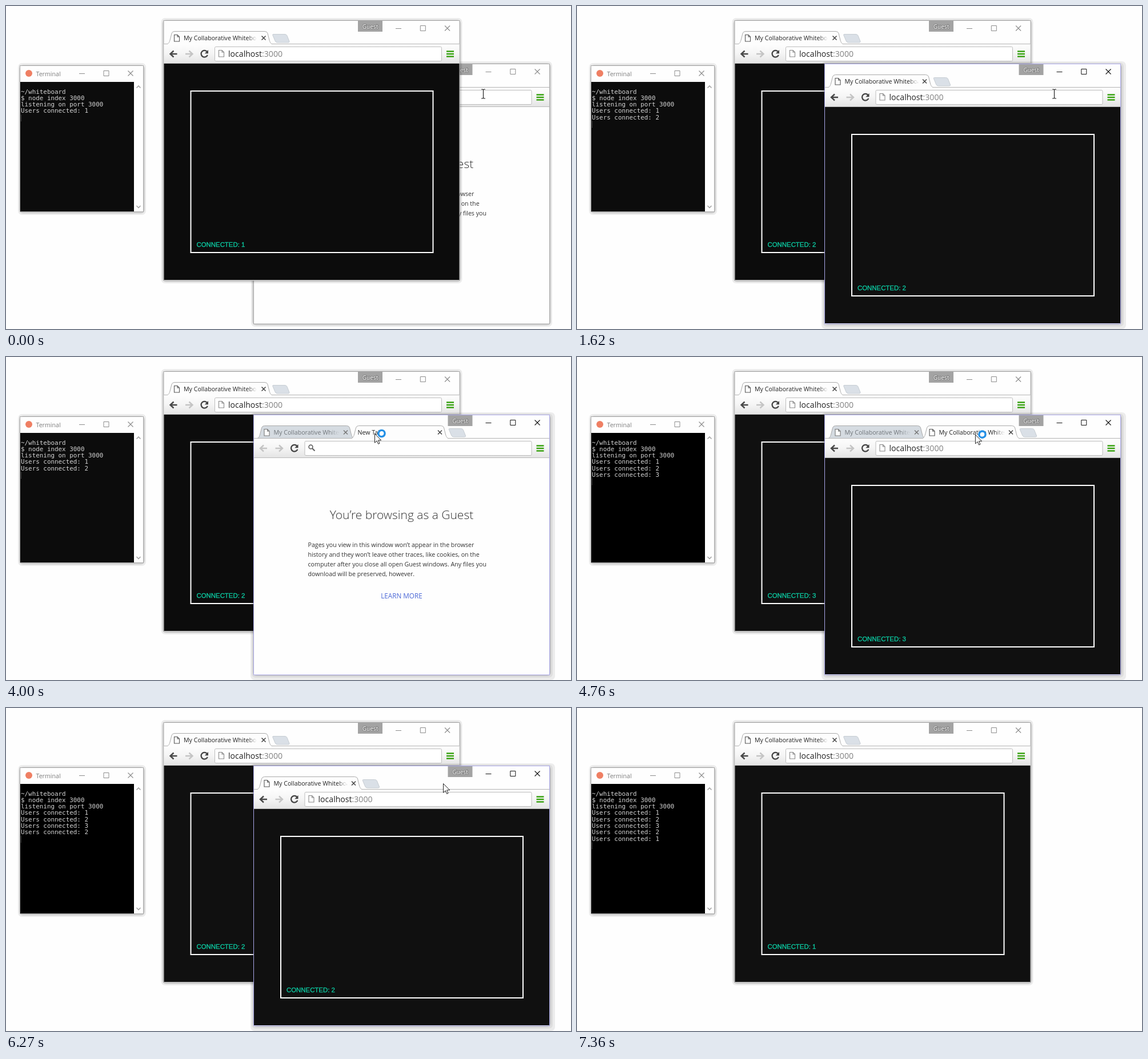
Recreate the animation shown at these times as an HTML page. Size 989 by 566 pixels, loop 7810 ms.

```html
<!DOCTYPE html>
<html lang="en">
<head>
<meta charset="utf-8">
<title>Collaborative whiteboard</title>
<style>
html, body { margin: 0; width: 100%; height: 100%; overflow: hidden; background: #fefefe; }
svg { display: block; }
text { white-space: pre; }
.ui { font-family: "Open Sans", "Noto Sans", sans-serif; font-size: 10.65px; }
.url { font-size: 14.1px; }
.head { font-size: 21px; font-weight: 300; }
.mono { font-family: "DejaVu Sans Mono", monospace; font-size: 10.9px; }
.count { font-family: "Liberation Sans", Arial, sans-serif; font-size: 11.4px; fill: #0cc8a0; stroke: #0cc8a0; stroke-width: .35px; }
</style>
</head>
<body>
<svg id="stage" width="989" height="566" viewBox="0 0 989 566">
  <defs>
    <linearGradient id="bar" x2="0" y2="1">
      <stop offset="0" stop-color="#fdfdfd"/><stop offset=".45" stop-color="#f6f6f6"/><stop offset="1" stop-color="#e3e3e3"/>
    </linearGradient>
    <linearGradient id="fadeOn">
      <stop offset="0" stop-color="#fdfdfd" stop-opacity="0"/><stop offset="1" stop-color="#fdfdfd"/>
    </linearGradient>
    <linearGradient id="fadeOff">
      <stop offset="0" stop-color="#d5dbe1" stop-opacity="0"/><stop offset="1" stop-color="#d5dbe1"/>
    </linearGradient>
  </defs>
  <g id="view"></g>
</svg>
<script>
const LOOP = 7810;
const TITLE = 'My Collaborative Whiteboard';
const URL_TEXT = 'localhost:3000';
const view = document.getElementById('view');
const pen = document.createElement('canvas').getContext('2d');

const clamp = v => Math.max(0, Math.min(1, v));
const span = (t, a, b) => clamp((t - a) / (b - a));
const smooth = k => k * k * (3 - 2 * k);
const within = (t, a, b) => t >= a && t < b;

const rect = (x, y, w, h, fill, more = '') =>
  `<rect x="${x}" y="${y}" width="${w}" height="${h}" fill="${fill}" ${more}/>`;
const path = (d, stroke, width = 1, fill = 'none', more = '') =>
  `<path d="${d}" stroke="${stroke}" stroke-width="${width}" fill="${fill}" ${more}/>`;
const text = (x, y, str, cls, fill, more = '') =>
  `<text x="${x}" y="${y}" class="${cls}" fill="${fill}" ${more}>${str}</text>`;
const move = (x, y, body) => `<g transform="translate(${x} ${y})">${body}</g>`;

function textWidth(str) {
  pen.font = '14.1px "Open Sans", "Noto Sans", sans-serif';
  return pen.measureText(str).width;
}

// Connected users over time: [ms, count]
const USERS = [[0, 1], [1300, 2], [4420, 3], [5940, 2], [6980, 1]];
const usersAt = t => USERS.filter(u => t >= u[0]).map(u => u[1]);

// Pointer strokes: start ms, end ms, then the points of a quadratic curve
const STROKES = [
  [2870, 3120, [835, 154], [780, 82], [645, 134]],
  [4570, 4910, [645, 134], [690, 136], [731, 136]],
  [5050, 5570, [731, 136], [782, 146], [765, 132]],
  [6270, 6850, [765, 132], [860, 114], [940, 112]],
  [7100, 7350, [940, 112], [942, 330], [942, 570]]
];

function pointerAt(t) {
  const [from, to, a, c, b] = STROKES.filter(s => t >= s[0]).pop() || STROKES[0];
  const k = smooth(span(t, from, to)), j = 1 - k;
  return a.map((v, i) => j * j * v + 2 * j * k * c[i] + k * k * b[i]);
}

// One typed letter, then the suggestion list, then the completed address
function typingAt(t) {
  const start = t < 4170 ? 1050 : 4170, age = t - start;
  return within(age, 0, 530) ? { list: age >= 30, tail: age >= 210 } : null;
}

function shadow(x, y, w, h, active) {
  const layer = (l, t, r, b, o) =>
    rect(x - l, y - t, w + l + r, h + t + b, '#000', `rx="7" opacity="${o}"`);
  return active
    ? layer(5, 4, 9, 9, .07) + layer(3, 2, 5, 5, .06) + layer(1, 0, 2, 2, .12)
    : layer(4, 4, 4, 5, .07) + layer(2, 1, 2, 2.5, .12);
}

function captionButtons(x, y, gap, color, hot) {
  const c = x + gap * 2;
  return (hot ? rect(c - 21, y - 13, 43, 27, '#e81123') : '') +
    path(`M${x - 5} ${y + .5}h10`, color) +
    path(`M${x + gap - 4.5} ${y - 4.5}h9v9h-9z`, color) +
    path(`M${c - 4.5} ${y - 4.5}l9 9m0 -9l-9 9`, hot ? '#fff' : color, 1.1);
}

const pageIcon = (x, y, color) =>
  path(`M${x + .5} ${y + .5}h5.5l3.5 3.5v8h-9zM${x + 6} ${y + .5}v3.5h3.5`, color, 1.1, '#fff');
const searchIcon = (x, y) =>
  `<circle cx="${x}" cy="${y}" r="3.4" fill="none" stroke="#666" stroke-width="1.7"/>` +
  path(`M${x + 2.5} ${y + 2.5}l4.5 4.5`, '#666', 2.2);

function tab(left, w, { active, title, hot }) {
  const r = left + w, close = r - 16, blank = title === 'New Tab';
  const tx = left + (blank ? 12 : 30), room = Math.max(0, close - 12 - tx);
  const shape = `M${left} 67C${left + 4} 66 ${left + 4.5} 64 ${left + 6} 60L${left + 9} 48Q${left + 10} 44.5 ${left + 14} 44.5` +
    `H${r - 14}Q${r - 10} 44.5 ${r - 9} 48L${r - 6} 60C${r - 4.5} 64 ${r - 4} 66 ${r} 67`;
  const fade = rect(Math.max(0, room - 16), 0, 16, 20, `url(#${active ? 'fadeOn' : 'fadeOff'})`);
  return path(shape, '#aaa', 1, active ? '#fdfdfd' : '#d5dbe1') +
    (blank ? '' : pageIcon(left + 13, 50, active ? '#555' : '#777')) +
    `<svg x="${tx}" y="45" width="${room}" height="20">${text(0, 15, title, 'ui', active ? '#222' : '#70757a')}${fade}</svg>` +
    (hot ? `<circle cx="${close}" cy="56" r="7" fill="#b5443a"/>` : '') +
    path(`M${close - 3.5} 52.5l7 7m0 -7l-7 7`, hot ? '#fff' : active ? '#444' : '#777', 1.5);
}

const newTabButton = (x, hot) =>
  path(`M${x + 2} 49.5H${x + 22}Q${x + 25} 49.5 ${x + 26} 52L${x + 30} 62Q${x + 30.5} 64 ${x + 28} 64H${x + 9}` +
    `Q${x + 6} 64 ${x + 5} 61L${x + 1} 51.5Q${x} 49.5 ${x + 2} 49.5z`, '#c6ccd2', 1, hot ? '#bfc4c9' : '#dae0e7');

function tabStrip(tabs, hotNew) {
  let right = 281;
  const parts = tabs.map((tb, i) => {
    const left = i ? right - 7 : 281;
    right = left + tb.w;
    return { active: tb.active, svg: tab(left, tb.w, tb) };
  });
  const layer = active => parts.filter(p => p.active === active).map(p => p.svg).join('');
  return newTabButton(right - 1, hotNew) + layer(false) + path('M276.5 66.5H793.5', '#b4b4b4') + layer(true);
}

const urlText = (x, y) => text(x, y, 'localhost<tspan fill="#808080">:3000</tspan>', 'ui url', '#222');

function omnibox({ blank, caret, typing }) {
  if (typing) {
    const head = URL_TEXT[0], tail = URL_TEXT.slice(1), x = 389 + textWidth(head);
    return pageIcon(372, 77, '#888') + text(389, 89, head, 'ui url', '#222') +
      (typing.tail ? rect(x, 72, textWidth(tail), 21, '#3390ff') + text(x, 89, tail, 'ui url', '#fff') : '');
  }
  if (blank) return searchIcon(376, 81.5) + (caret ? rect(388.5, 72, 1, 21, '#222') : '');
  return pageIcon(372, 77, '#888') + urlText(389, 89);
}

function suggestions() {
  const head = URL_TEXT[0];
  return rect(276.5, 97, 517, 65, '#fff') + rect(276.5, 101, 517, 29, '#e8e8e8') +
    pageIcon(372, 109, '#888') +
    text(389, 121, `<tspan font-weight="700">${head}</tspan>${URL_TEXT.slice(1)}`, 'ui url', '#3367d6') +
    searchIcon(376, 143) + text(389, 150, `${head}<tspan fill="#888"> - Web Search</tspan>`, 'ui url', '#222') +
    path('M276.5 161.5H793.5', '#b4b4b4');
}

function toolbar(state) {
  const back = state.blank ? '#c4c4c4' : '#484848';
  return rect(276.5, 67, 517, 34, 'url(#bar)') + path('M276.5 100.5H793.5', '#b9b9b9') +
    path('M287.5 84h12M293.5 78.5l-6 5.5l6 5.5', back, 2.4) +
    path('M314 84h12M320.5 78.5l6 5.5l-6 5.5', '#c4c4c4', 2.4) +
    path('M352 80.2A5.8 5.8 0 1 0 352.8 85.8', '#444', 2.3) + path('M354 77v6.2h-6.2z', 'none', 0, '#444') +
    rect(365.5, 71.5, 397, 25, '#fff', 'rx="2" stroke="#bdbdbd"') + omnibox(state) +
    [78.3, 82.8, 87.3].map(y => rect(771, y, 13, 2.4, '#33a00a')).join('');
}

const board = (count, bg) => rect(276.5, 101, 517, 379, bg) +
  rect(323.5, 149, 424, 283, 'none', 'stroke="#fff" stroke-width="2"') +
  text(333.5, 422, `CONNECTED: ${count}`, 'count', '');

function guestPage() {
  const lines = [
    'Pages you view in this window won’t appear in the browser',
    'history and they won’t leave other traces, like cookies, on the',
    'computer after you close all open Guest windows. Any files you',
    'download will be preserved, however.'
  ];
  return rect(276.5, 101, 517, 379, '#fefefe') +
    text(535, 208, 'You’re browsing as a Guest', 'ui head', '#333', 'text-anchor="middle"') +
    lines.map((s, i) => text(371, 256.5 + i * 17, s, 'ui', '#333')).join('') +
    text(535, 346.5, 'LEARN MORE', 'ui', '#4a67d6', 'text-anchor="middle" style="font-size:11.7px"');
}

function browser(state) {
  const { active, tabs, hotNew, hotClose, typing, blank, count, bg, flat } = state;
  return (flat ? '' : shadow(275.5, 25, 519, 456, active)) +
    rect(276, 25.5, 518, 455.5, '#fefefe', `stroke="${active ? '#aaa8ea' : '#a9a9a9'}"`) +
    rect(616, 26, 43, 19, '#a3a3a3') +
    text(637.5, 39.5, 'Guest', 'ui', '#fff', 'text-anchor="middle" style="font-size:10px;paint-order:stroke" stroke="#777" stroke-width="1.6"') +
    captionButtons(687, 39, 42.8, active ? '#111' : '#8c8c8c', hotClose) +
    tabStrip(tabs, hotNew) + toolbar(state) +
    (blank ? guestPage() : board(count, bg)) +
    (typing && typing.list ? suggestions() : '');
}

function terminal(t) {
  const lines = ['~/whiteboard', '$ node index 3000', 'listening on port 3000']
    .concat(usersAt(t).map(n => `Users connected: ${n}`));
  const y = i => 153.6 + i * 11.28;
  const caretY = y(lines.length) - 8;
  return shadow(25, 104, 216, 257, false) +
    rect(24.5, 104.5, 216, 256, '#fefefe', 'stroke="#a9a9a9"') +
    '<circle cx="40" cy="118" r="6" fill="#ef7f63"/>' +
    text(52.5, 122.5, 'Terminal', 'ui', '#7c7c7c') +
    captionButtons(133, 118, 42.5, '#8c8c8c') +
    rect(25, 133, 199, 227, t < 4420 ? '#0c0c0c' : '#000') +
    path('M228.5 143.5l3.5 -3.5l3.5 3.5M228.5 350l3.5 3.5l3.5 -3.5', '#a6a6a6', 1.6) +
    lines.map((s, i) => text(26, y(i), s, 'mono', '#d4d4d4')).join('') +
    path(`M26.5 ${caretY}v11`, '#777', 1, 'none', 'stroke-dasharray="1 1"');
}

function guestState(t, [px, py]) {
  const opening = within(t, 3520, 5820), closing = within(t, 5820, 6000);
  const two = opening || closing;
  const k = closing ? 1 - smooth(span(t, 5820, 6000)) : smooth(span(t, 3500, 3690));
  const near = t > 5050 && Math.hypot(px - 759.5, py - 132) < 7;
  const tabs = [{ w: two ? 186 - 14 * k : 186, active: !opening, title: t < 1620 ? 'New Tab' : TITLE }];
  if (two) tabs.push({ w: 172 * (.2 + .8 * k), active: opening, title: t < 4740 ? 'New Tab' : TITLE, hot: near && opening });
  return {
    active: t >= 310, tabs, typing: typingAt(t),
    blank: t < 1580 || within(t, 3550, 4700),
    count: usersAt(t).pop(), bg: '#101010',
    caret: within(t, 310, 860) || within(t, 3550, 4000),
    hotNew: within(t, 3090, 3520),
    hotClose: t > 6270 && px > 909 && py < 129,
    flat: t >= 6980
  };
}

function guestWindow(t, tip) {
  const k = span(t, 6960, 7180);
  if (k >= 1) return '';
  return `<g opacity="${1 - k}" transform="translate(692.5 329) scale(${1 - .1 * k}) translate(-535 -253)">` +
    browser(guestState(t, tip)) + '</g>';
}

const mainWindow = t => browser({
  active: false, tabs: [{ w: 186, active: true, title: TITLE }],
  count: usersAt(t).pop(), bg: t < 4420 ? '#0c0c0c' : '#101010'
});

function pointer(t, [x, y]) {
  if (t >= 7360) return '';
  if (t < 3000 && y > 147) {
    const beam = 'M-3.5 -8h2.5l1 1l1 -1h2.5M0 -7V7M-3.5 8h2.5l1 -1l1 1h2.5';
    return move(x + .5, y, path(beam, '#fff', 2.6) + path(beam, '#222', 1.2));
  }
  const ring = '<circle cx="12.5" r="5.6" fill="#fff" stroke="#2490e6" stroke-width="3.4"/>';
  return move(x, y, path('M.5 .5V16.3L4.2 12.8L6.6 18.4L9 17.4L6.6 11.9H11.7z', '#222', 1, '#fff') +
    (within(t, 3330, 5480) ? ring : ''));
}

function draw(t) {
  const tip = pointerAt(t);
  const guest = guestWindow(t, tip), main = mainWindow(t);
  return terminal(t) + (t < 310 ? guest + main : main + guest) + pointer(t, tip);
}

let shown = '';
const start = performance.now();
function tick() {
  const next = draw((performance.now() - start) % LOOP);
  if (next !== shown) view.innerHTML = shown = next;
  requestAnimationFrame(tick);
}
tick();
</script>
</body>
</html>
```
